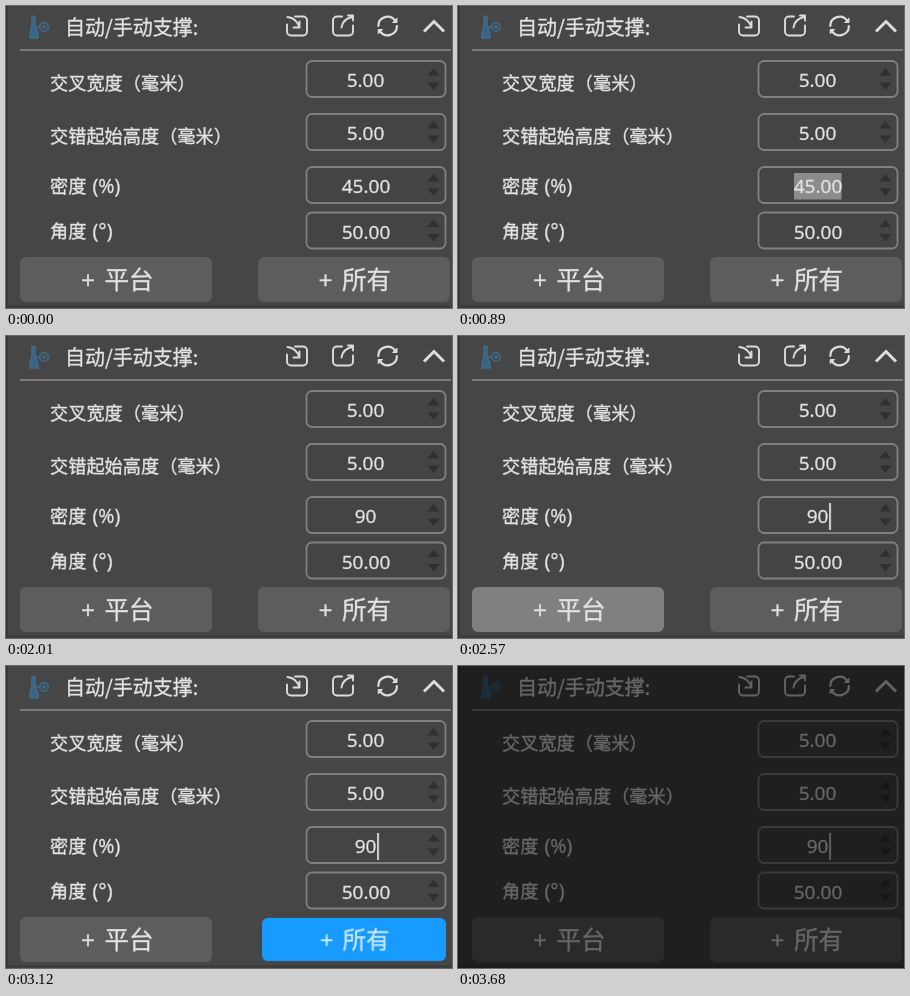
Recreate the animation shown at these times as an HTML page. Size 446x302 px, loop 3900 ms.

```html
<!DOCTYPE html>
<html lang="zh-CN">
<head>
<meta charset="utf-8">
<title>支撑设置</title>
<style>
html, body { margin: 0; width: 100%; height: 100%; overflow: hidden; background: #464646; }
svg { display: block; width: 100%; height: 100%; color: #e2e2e2; }
text {
  fill: currentColor; stroke: currentColor; stroke-width: .35px;
  font-family: "Open Sans", "Noto Sans CJK SC", "Noto Sans CJK", sans-serif;
}
.cjk { font-family: "Noto Sans CJK SC", "Noto Sans CJK", sans-serif; }
.title { font-size: 20px; }
.label { font-size: 18.2px; }
.unit { font-size: 19.7px; }
.value text { font-size: 19px; text-anchor: middle; }
.button text { font-size: 24.5px; }
.button rect { fill: #5c5d5f; }
.icon { fill: none; stroke: #dcdcdc; stroke-width: 1.9; stroke-linecap: round; stroke-linejoin: round; }
.field { fill: #444; stroke: #808080; stroke-width: 1.8; }
.arrow { fill: #303030; }
.caret { fill: #f4f4f4; }

/* Every state change is a hard cut. */
.anim, .anim rect, .anim text { animation: 3.9s step-end infinite; }
#old { animation-name: old; }
#one { animation-name: one; }
#two { animation-name: two; }
#selection { animation-name: selection; }
#caret { animation-name: caret; }
#platform rect { animation-name: hover; }
#all { animation-name: press; transform-origin: 348px 274px; }
#all rect { animation-name: fill; }
#all text { animation-name: ink; }
#shade { animation-name: shade; }

@keyframes old { 0% { opacity: 1 } 35.38%, 100% { opacity: 0 } }
@keyframes one { 0% { opacity: 0 } 35.38% { opacity: 1 } 44.35%, 100% { opacity: 0 } }
@keyframes two { 0% { opacity: 0 } 44.35%, 100% { opacity: 1 } }
@keyframes selection { 0% { opacity: 0 } 8.71% { opacity: 1 } 35.38%, 100% { opacity: 0 } }
@keyframes caret {
  0% { opacity: 0; transform: translateX(384px) }
  5.38% { opacity: 1; transform: translateX(384px) }
  22.82% { opacity: 0; transform: translateX(384px) }
  35.38% { opacity: 1; transform: translateX(366px) }
  44.35% { opacity: 1; transform: translateX(371.2px) }
  51.53% { opacity: 0; transform: translateX(371.2px) }
  65.89% { opacity: 1; transform: translateX(371.2px) }
  83.58% { opacity: 0; transform: translateX(371.2px) }
  94.35%, 100% { opacity: 1; transform: translateX(371.2px) }
}
@keyframes hover { 0% { fill: #5c5d5f } 58.71% { fill: #808080 } 69.48%, 100% { fill: #5c5d5f } }
@keyframes press { 0% { transform: none } 78.2% { transform: scale(.958) } 83.58%, 100% { transform: none } }
@keyframes fill {
  0% { fill: #5c5d5f }
  71.28% { fill: #808080 }
  78.2% { fill: #179bff }
  82.05% { fill: #808080 }
  83.58% { fill: #6c6c6c }
  85.38%, 100% { fill: #5c5d5f }
}
@keyframes ink { 0% { color: #e2e2e2 } 78.2% { color: #cce8fc } 82.05%, 100% { color: #e2e2e2 } }
@keyframes shade { 0% { opacity: 0 } 82.05%, 100% { opacity: .55 } }
</style>
</head>
<body>
<svg viewBox="0 0 446 302" preserveAspectRatio="none">
  <defs>
    <g id="spin">
      <rect class="field" x="300.5" y="-18" width="139" height="36" rx="5.5"/>
      <path class="arrow" d="M421.5-3.5l6-7.5 6 7.5zM421.5 3.5l6 7.5 6-7.5z"/>
    </g>
  </defs>

  <rect width="446" height="302" fill="#464646"/>
  <path d="M1 0V302M0 300.5H446" stroke="#383838" stroke-width="2"/>

  <g fill="none" stroke="#3e6c8c" stroke-width="1.6">
    <path d="M26 10.5h3v9l3 9v3.5h-8v-3.5l2-9z" fill="#3a6482"/>
    <circle cx="38" cy="21" r="4.3"/>
    <circle cx="38" cy="21" r="1.2"/>
    <path d="M30 21h3.5"/>
  </g>
  <text class="title cjk" x="59" y="28.5">自动/手动支撑:</text>

  <g class="icon">
    <path d="M289 10.5h8a4 4 0 0 1 4 4v11a4 4 0 0 1-4 4h-12a4 4 0 0 1-4-4v-7"/>
    <path d="M281.5 11q9 1 12 10.5M287.500 21.500h6v-6"/>
    <path d="M336 10.500h-5a4 4 0 0 0-4 4v11a4 4 0 0 0 4 4h12a4 4 0 0 0 4-4v-6"/>
    <path d="M335.500 21.500q1-8.500 11-10.500M342 9.500h5v5"/>
    <path d="M372.300 20a9.300 9.300 0 0 1 17-5.200M390.900 20a9.300 9.300 0 0 1-17 5.200" stroke-width="2.200"/>
    <path d="M391 12.500v4h-4zM372.200 27.500v-4h4z" fill="#dcdcdc" stroke-width="1"/>
    <path d="M418 25.500l10-10 10 10" stroke-width="3" stroke-linecap="butt" stroke-linejoin="miter"/>
  </g>
  <path d="M14 44H445" stroke="#8c8c8c" stroke-width="1.700"/>

  <g class="label">
    <text class="cjk" x="44" y="84">交叉宽度（毫米）</text>
    <text class="cjk" x="44" y="137">交错起始高度（毫米）</text>
    <text class="cjk" x="44" y="186.500">密度</text>
    <text class="unit" x="86.500" y="186.500">(%)</text>
    <text class="cjk" x="44" y="231.500">角度</text>
    <text class="unit" x="86.500" y="231.500">(°)</text>
  </g>

  <use href="#spin" y="73"/>
  <use href="#spin" y="126"/>
  <use href="#spin" y="179"/>
  <use href="#spin" y="224.500"/>

  <g class="value">
    <text x="359.500" y="81">5.00</text>
    <text x="359.500" y="134">5.00</text>
    <rect id="selection" class="anim" x="336" y="167" width="47.500" height="26.500" fill="#8c8c8c"/>
    <text id="old" class="anim" x="360" y="187">45.00</text>
    <text id="one" class="anim" x="360" y="187">9</text>
    <text id="two" class="anim" x="359.500" y="187">90</text>
    <rect id="caret" class="anim caret" y="167" width="1.600" height="27"/>
    <text x="360" y="232.500">50.00</text>
  </g>

  <g id="platform" class="button anim">
    <rect x="14" y="251" width="192" height="45" rx="6"/>
    <text x="75" y="283">+</text>
    <text class="cjk" x="98.500" y="283">平台</text>
  </g>
  <g id="all" class="button anim">
    <rect x="252" y="251" width="192" height="45" rx="6"/>
    <text x="312.500" y="283">+</text>
    <text class="cjk" x="336" y="283">所有</text>
  </g>

  <rect id="shade" class="anim" width="446" height="302"/>
</svg>
</body>
</html>
```
